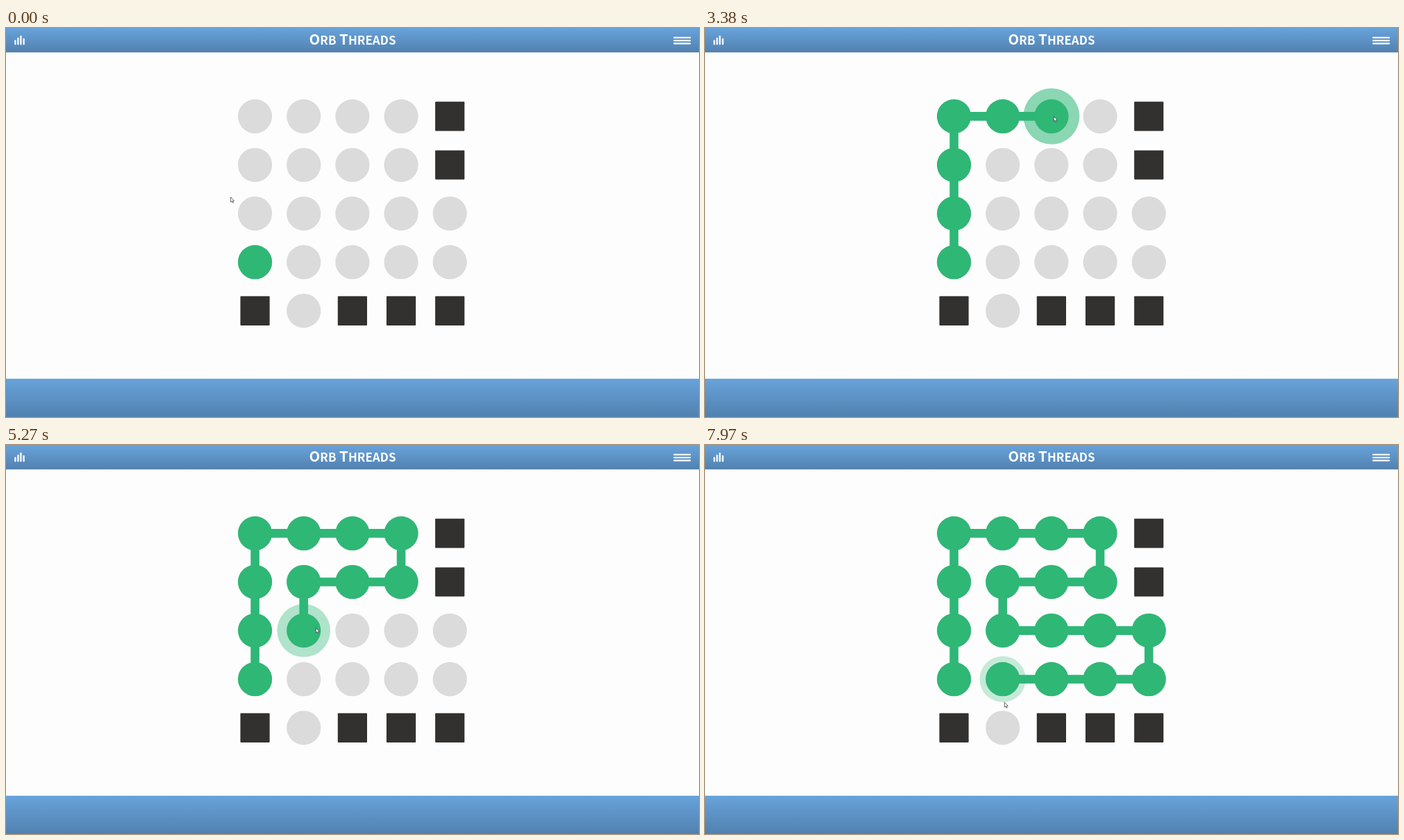
An HTML page that plays this animation: 998 px wide and 561 px high, repeating every 8000 ms.

```html
<!DOCTYPE html>
<html lang="en">
<head>
<meta charset="utf-8">
<title>Orb Threads</title>
<style>
  html, body { margin: 0; width: 100%; height: 100%; overflow: hidden; background: #fdfdfd; }
  svg { display: block; width: 100vw; height: 100vh; }
  text { font-family: "Noto Sans CJK JP", "Noto Sans CJK SC", "Noto Sans CJK", "Open Sans", sans-serif; font-weight: 700; fill: #fff; }
</style>
</head>
<body>
<svg viewBox="0 0 998 561">
  <defs>
    <linearGradient id="bar" x2="0" y2="1">
      <stop stop-color="#68a3db"/><stop offset="1" stop-color="#5181af"/>
    </linearGradient>
  </defs>
  <rect width="998" height="35.2" fill="url(#bar)"/>
  <rect y="505.8" width="998" height="55.2" fill="url(#bar)"/>
  <path d="M13.4 18.3V23.3M17.4 15V23.3M21.4 12V23.3M25.6 16V23.3" stroke="#fff" stroke-width="2.3" stroke-linecap="round"/>
  <path d="M962.2 13.9H985.2M962.2 18.1H985.2M962.2 22.3H985.2" stroke="#fff" stroke-width="2.3" stroke-linecap="round"/>
  <text x="499" y="24.3" text-anchor="middle" font-size="20.5">O<tspan font-size="17">RB</tspan> T<tspan font-size="17">HREADS</tspan></text>
  <g id="board"></g>
  <path id="trail" fill="none" stroke="#2fb778" stroke-width="12.6"/>
  <circle id="ring" fill="#2fb778"/>
  <g id="lit" fill="#2fb775"></g>
  <path id="cursor" d="M0 0V7.2L1.7 5.8L2.9 8.4L4 7.9L2.9 5.4H5Z" fill="#fff" stroke="#444" stroke-width=".8" stroke-linejoin="round"/>
</svg>
<script>
const LOOP = 8000, PULSE = 250, R = 24.6, SIDE = 42.2;
const $ = id => document.getElementById(id);
const px = c => 358.6 + 70.15 * c;
const py = r => 127.4 + 70.1 * r;

function add(parent, tag, attrs) {
  const el = document.createElementNS("http://www.w3.org/2000/svg", tag);
  for (const k in attrs) el.setAttribute(k, attrs[k]);
  return parent.appendChild(el);
}

// '#' is a wall, 'o' a free dot
["oooo#", "oooo#", "ooooo", "ooooo", "#o###"].forEach((row, r) =>
  [...row].forEach((cell, c) => {
    if (cell === "o") add($("board"), "circle", { cx: px(c), cy: py(r), r: R, fill: "#dbdbdb" });
    else add($("board"), "rect", { x: px(c) - SIDE / 2, y: py(r) - SIDE / 2, width: SIDE, height: SIDE, rx: 1, fill: "#32312f" });
  }));

// The route in legs of even pace: moves and arrival time
const MOVES = { U: [0, -1], D: [0, 1], L: [-1, 0], R: [1, 0] };
const legs = { UUU: 2655, RRRD: 3895, LLD: 5100, RRRDL: 7085, LLD: 8020 };
const start = { c: 0, r: 3, t: 1960 };
const stops = [];

function visit(c, r, t) {
  const x = px(c), y = py(r);
  stops.push({ c, r, x, y, t, el: add($("lit"), "circle", { cx: x, cy: y, r: R }) });
}

visit(start.c, start.r, start.t);
for (const [moves, end] of [["UUU", 2655], ["RRRD", 3895], ["LLD", 5100], ["RRRD", 6746], ["LLL", 7765], ["D", 8020]]) {
  const from = stops[stops.length - 1];
  [...moves].forEach((m, i) => {
    const { c, r } = stops[stops.length - 1];
    visit(c + MOVES[m][0], r + MOVES[m][1], from.t + (end - from.t) * (i + 1) / moves.length);
  });
}

// The hand walks from its resting place to the first dot, then along the route
const LAG = 90, BLUR = 220;
const walk = [{ x: 323.6, y: 243.8, t: 700 }, { ...stops[0], t: 1500 }, ...stops];

function walkAt(t) {
  const i = Math.max(1, walk.findIndex(s => s.t > t));
  const b = t < walk[walk.length - 1].t ? walk[i] : walk[walk.length - 1];
  const a = walk[walk.indexOf(b) - 1];
  const p = Math.min(1, Math.max(0, (t - a.t) / (b.t - a.t)));
  return [a.x + (b.x - a.x) * p, a.y + (b.y - a.y) * p];
}

// Averaging over a time window rounds off the corners
function pointerAt(t) {
  const N = 24;
  let x = 0, y = 0;
  for (let i = 0; i < N; i++) {
    const [wx, wy] = walkAt(t - LAG + BLUR * ((2 * i + 1) / N - 1));
    x += wx / N;
    y += wy / N;
  }
  return [x, y];
}

function draw(t) {
  const done = stops.filter(s => s.t <= t);
  stops.forEach((s, i) => s.el.style.display = !i || s.t <= t ? "" : "none");
  $("trail").setAttribute("d", done.map((s, i) => (i ? "L" : "M") + s.x + " " + s.y).join(""));

  const last = done[done.length - 1];
  const p = last ? (t - last.t) / PULSE : 1;
  const ring = $("ring");
  ring.style.display = p < 1 ? "" : "none";
  if (p < 1) {
    ring.setAttribute("cx", last.x);
    ring.setAttribute("cy", last.y);
    ring.setAttribute("r", R + 16.3 * Math.sin(Math.PI * p));
    ring.setAttribute("opacity", 0.84 - 0.68 * p);
  }
  $("cursor").setAttribute("transform", `translate(${pointerAt(t)})`);
}

const began = performance.now();
function tick() {
  draw((performance.now() - began) % LOOP);
  requestAnimationFrame(tick);
}
tick();
</script>
</body>
</html>
```
